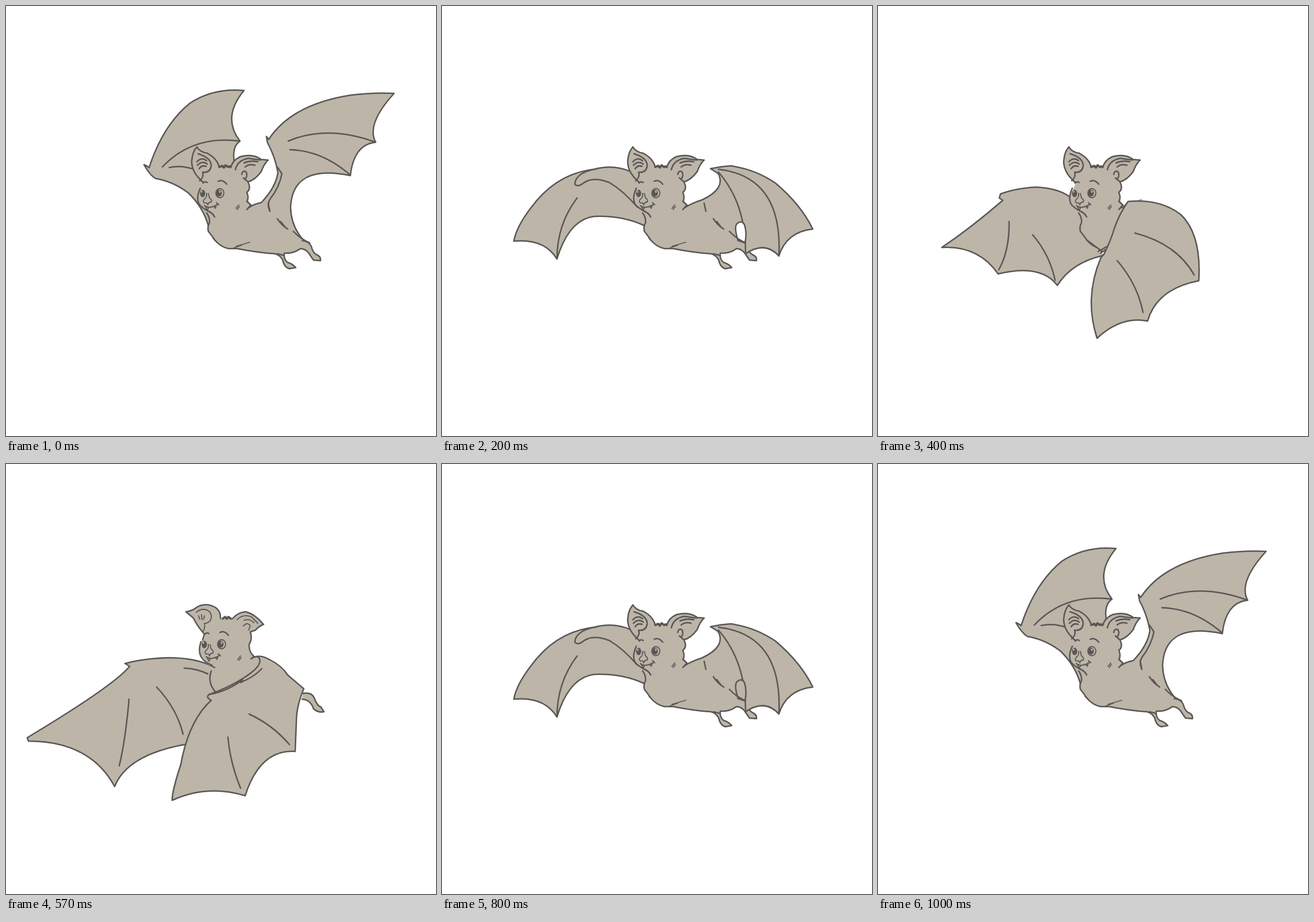
An HTML page that plays this animation: 748x748 px, repeating every 1030 ms.

```html
<!DOCTYPE html>
<html>
<head>
<meta charset="utf-8">
<style>
html, body { margin: 0; width: 100%; height: 100%; overflow: hidden; background: #fff; }
svg { display: block; width: 100vw; height: 100vh; }
path, ellipse { fill: none; stroke: #595755; stroke-width: 2.5; stroke-linecap: round; stroke-linejoin: round; }
.shape, .fill { fill: #bdb5a8; }
.fill { stroke: none; }
.fine { stroke-width: 1.8; }
.bold { stroke-width: 4; }
.hole { fill: #fff; }
.dark { fill: #595755; stroke: none; }
</style>
</head>
<body>
<svg id="stage" viewBox="0 0 748 748"></svg>
<script>
const draw = (d, kind = '') => `<path class="${kind}" d="${d}"/>`;
const shape = d => draw(d, 'shape');
const fill = d => draw(d, 'fill');
const fine = d => draw(d, 'fine');

const chest = 'M349 360Q355 368 354 377Q350 384 352 392Q360 402 363 407Q373 419 387 422L402 422';
const belly = 'Q437 429 468 431Q476 433 481 441Q484 455 493 457L504 455Q499 449 490 446Q483 441 484 430Q500 431 512 422Q520 422 526 429Q532 438 535 442L547 443Q548 436 541 433Q534 430 531 418Q527 409 515 408';
const torso = fill(chest + belly + 'L458 335L419 353L400 320L345 330Z') + draw(chest + belly) +
  draw('M472 431L484 434');
const furTicks = draw('M456 343L459 357M472 370Q479 381 490 388M478 375L485 384M500 392Q511 404 528 412') +
  fine('M400 418L424 411M396 421L410 416M360 404L367 411');

const face =
  draw('M343 308Q346 304 350 307M369 305Q377 301 384 310') +
  '<ellipse cx="342" cy="326" rx="4.5" ry="6.5" class="dark"/>' +
  '<ellipse cx="372" cy="325.5" rx="7" ry="8" class="fine"/>' +
  '<ellipse cx="370.5" cy="325.5" rx="5" ry="6" class="dark"/>' +
  '<ellipse cx="372" cy="323" rx="1.6" ry="2" class="fill"/>' +
  '<ellipse cx="340.5" cy="323" rx="1.3" ry="2" class="fill"/>' +
  fine('M349 326Q350 333 345 336Q341 341 346 343Q350 341 351 346Q352 341 357 341Q359 337 354 334L352 326M345 347Q349 351 355 350Q364 349 369 344M347 349L350 355L353 350M361 348L364 352L366 346M366 342L370 346') +
  fine('M400 352L405 346M402 354L406 349');

const headUp =
  fill('M339 303Q323 288 323 270Q324 254 332 245Q337 254 350 256Q367 265 371 280L391 281Q394 268 408 262Q430 256 444 267L456 268Q449 274 444 288Q434 302 421 306Q427 318 419 326Q420 339 426 346L419 354L362 366L341 351Q330 340 336 324Q343 315 343 307Z') +
  draw('M339 303Q323 288 323 270Q324 254 332 245Q337 254 350 256Q367 265 371 280M391 281Q394 268 408 262Q430 256 444 267L456 268Q449 274 444 288Q434 302 421 306L413 299M421 306Q427 318 419 324Q423 334 419 340L426 346L419 354M339 303L343 307M338 317Q330 334 336 345Q340 350 350 356Q360 360 363 367') +
  draw('M371 280L376 278L379 281L382 277L386 280L390 279', 'bold') +
  draw('M334 257Q357 264 357 278Q355 291 342 289Q345 297 337 304M399 285Q402 269 421 265L443 268M410 293Q411 286 417 288Q421 293 417 300') +
  draw('M332 271Q340 262 349 269M333 277Q342 268 350 275M336 283Q341 276 348 279M414 273Q425 268 438 271M416 280Q423 274 433 277') +
  face;

const headLow =
  fill('M345 296Q332 281 326 268L313 257Q324 256 332 249Q348 240 365 250Q374 257 373 269L394 269Q403 258 417 257Q433 261 448 279Q440 282 434 289L425 292Q429 304 423 314Q422 328 433 336L400 385L356 351Q333 340 338 316L345 296Z') +
  draw('M342 306L345 296Q332 281 326 268L313 257Q324 256 332 249Q348 240 365 250Q374 257 373 269M394 269Q403 258 417 257Q433 261 448 279Q440 282 434 289L425 292Q429 304 423 314Q422 328 433 336M339 309Q334 325 339 335Q344 344 358 350') +
  draw('M377 269L381 266L384 269L387 266L391 269', 'bold') +
  fine('M331 258Q343 248 354 257Q360 264 355 273Q349 278 345 277Q347 285 343 291M335 264L337 270M340 262L341 271M345 264L344 270M402 271Q412 260 427 266L438 277M414 272Q423 268 431 276M413 282Q419 274 425 281L422 289') +
  `<g transform="translate(3 -12)">${face}</g>`;

// Each pose stacks far wing, body, near wing and head.
const raised =
  fill('M249 281Q273 207 320 169Q361 142 414 147Q375 194 407 235Q393 244 397 271L352 382Q343 350 317 325Q290 305 260 300Q250 294 240 276Z') +
  draw('M352 382Q343 350 317 325Q290 305 260 300Q250 294 240 276Q245 278 249 281Q273 207 320 169Q361 142 414 147Q375 194 407 235Q393 244 397 271M272 280Q325 224 407 235M284 281Q305 276 330 285') +
  torso +
  fill('M419 353Q431 344 444 342Q469 316 473 290Q468 262 455 238L453 227L457 232Q497 171 600 155Q640 150 675 152Q626 206 643 237Q605 241 599 295Q499 274 495 350Q496 384 518 408L470 400Z') +
  draw('M419 353Q431 344 444 342Q469 316 473 290Q468 262 455 238L453 227L457 232Q497 171 600 155Q640 150 675 152Q626 206 643 237Q605 241 599 295Q499 274 495 350Q496 384 518 408M491 235Q559 206 643 237M494 250Q549 251 599 294M472 280L480 292Q475 316 460 335Q453 345 459 357') +
  furTicks + headUp;

const spread =
  shape('M352 382Q348 352 317 325Q280 303 240 283Q205 264 187 219Q245 168 299 176Q317 203 365 214Q389 234 393 272') +
  draw('M240 283Q252 220 299 176M244 283Q291 237 365 214') +
  torso +
  fill('M419 353Q463 332 476 290L458 230Q502 171 575 174Q650 185 698 263Q654 269 638 325Q593 318 572 361Q517 352 516 408L470 400Z') +
  draw('M419 353Q463 332 476 290Q470 257 456 226L459 232Q502 171 575 174Q650 185 698 263Q654 269 638 325Q593 318 572 361Q517 352 516 408M488 236Q578 225 638 325M484 249Q545 269 572 361M476 290Q473 316 460 335') +
  furTicks + headUp;

const levelPose = hole =>
  shape('M328 288Q298 275 265 284Q198 291 154 352Q129 385 125 409Q178 404 200 440Q221 371 265 366Q313 364 352 382L362 366L345 330L345 300') +
  draw('M269 283Q232 290 231 310Q236 316 246 308Q262 296 291 307Q315 321 340 350M200 440Q200 380 235 334') +
  torso +
  fill('M419 353Q431 344 453 337Q495 317 480 291L467 283Q485 279 502 278Q545 284 580 308Q624 345 645 388Q599 393 586 435Q562 408 528 431L515 408L470 400Z') +
  draw('M419 353Q431 344 453 337Q495 317 480 291L467 283Q485 279 502 278Q545 284 580 308Q624 345 645 388Q599 393 586 435Q562 408 528 431Q529 344 481 289M481 284Q593 297 586 435') +
  draw('M515 408Q507 383 514 378Q521 372 526 380Q531 395 527 412Z', hole) +
  furTicks + headUp;

const folded =
  shape('M345 330L332 331Q313 317 275 315Q238 317 213 327L211 334L217 338Q163 385 111 420Q174 416 209 466Q283 448 312 486Q337 446 392 434') +
  draw('M228 375Q229 425 210 459M269 398Q299 433 308 477') +
  torso +
  fill('M419 353L435 340L395 430L380 421Z') + draw('M419 353L435 345M363 407L390 427M383 427L399 418M387 430L400 421') +
  headUp +
  shape('M435 340Q491 335 527 363Q563 398 558 478Q485 492 469 548Q423 539 381 578Q358 507 388 437L393 432Q405 408 411 387Q420 361 435 340Z') +
  draw('M447 395Q520 414 550 468M416 443Q451 483 461 533');

const sweeping =
  shape('M345 330L325 330Q272 322 210 336L215 345Q145 402 75 449Q158 452 199 513Q272 472 313 487Q338 451 390 435') +
  draw('M221 390Q219 448 202 493M266 394Q296 429 307 472') +
  torso + headUp +
  shape('M432 338Q481 334 522 374L540 401Q533 445 532 489Q464 496 442 562Q388 551 335 582Q335 501 374 422Q413 388 432 338Z') +
  draw('M435 415Q490 431 521 478M401 459Q418 501 434 548');

const lowered =
  shape('M357 351Q328 337 283 337Q242 338 207 347L215 352Q187 386 37 476L39 482Q146 482 189 561Q211 505 316 487L385 430L363 355') +
  draw('M214 409Q208 479 197 525M262 388Q297 425 308 470M310 355Q332 356 351 365') +
  shape('M516 399Q533 396 537 409Q541 420 548 423L553 431Q543 433 535 426Q530 410 515 409') +
  headLow + fill('M357 352Q350 380 366 398L410 380L428 338Z') + draw('M357 351L363 354M357 360Q350 380 364 396') +
  shape('M427 338Q441 330 458 340Q480 351 490 367L518 391Q505 421 505 450L503 500Q442 496 416 577Q350 557 289 585Q289 568 304 523Q318 446 357 411Q347 406 353 401Q395 394 429 360Z') +
  fill('M410 385L421 340L433 335L441 350Z') +
  draw('M353 401Q387 389 412 373Q446 352 441 339Q438 331 426 339M408 380Q431 371 445 356M423 435Q464 454 493 488M386 475Q390 520 408 564');

const lifting =
  shape('M332 292Q300 244 255 230Q183 286 158 410Q192 409 212 446Q230 367 283 364Q323 366 352 382L362 366L345 330L345 300') +
  draw('M340 350Q301 288 262 258Q249 248 247 235M212 446Q198 352 255 278') +
  torso +
  fill('M419 353Q463 337 477 300L459 229Q521 204 575 263Q618 321 626 404Q588 402 566 446Q548 411 519 412L470 400Z') +
  draw('M419 353Q463 337 477 300L459 229Q521 204 575 263Q618 321 626 404Q588 402 566 446Q548 411 519 412M464 235Q560 286 566 446M473 271Q520 325 519 412') +
  furTicks + headUp;

const timeline = [
  [0, raised], [30, spread], [200, levelPose('hole')], [400, folded], [470, sweeping],
  [570, lowered], [800, levelPose('shape')], [830, lifting], [1000, raised]
];
const loop = 1030;
const stage = document.getElementById('stage');
const origin = performance.now();
let current;

function render(now) {
  const time = Math.max(0, now - origin) % loop;
  const pose = timeline.findLast(([start]) => start <= time)[1];
  if (pose !== current) stage.innerHTML = current = pose;
  requestAnimationFrame(render);
}
render(origin);
</script>
</body>
</html>
```
